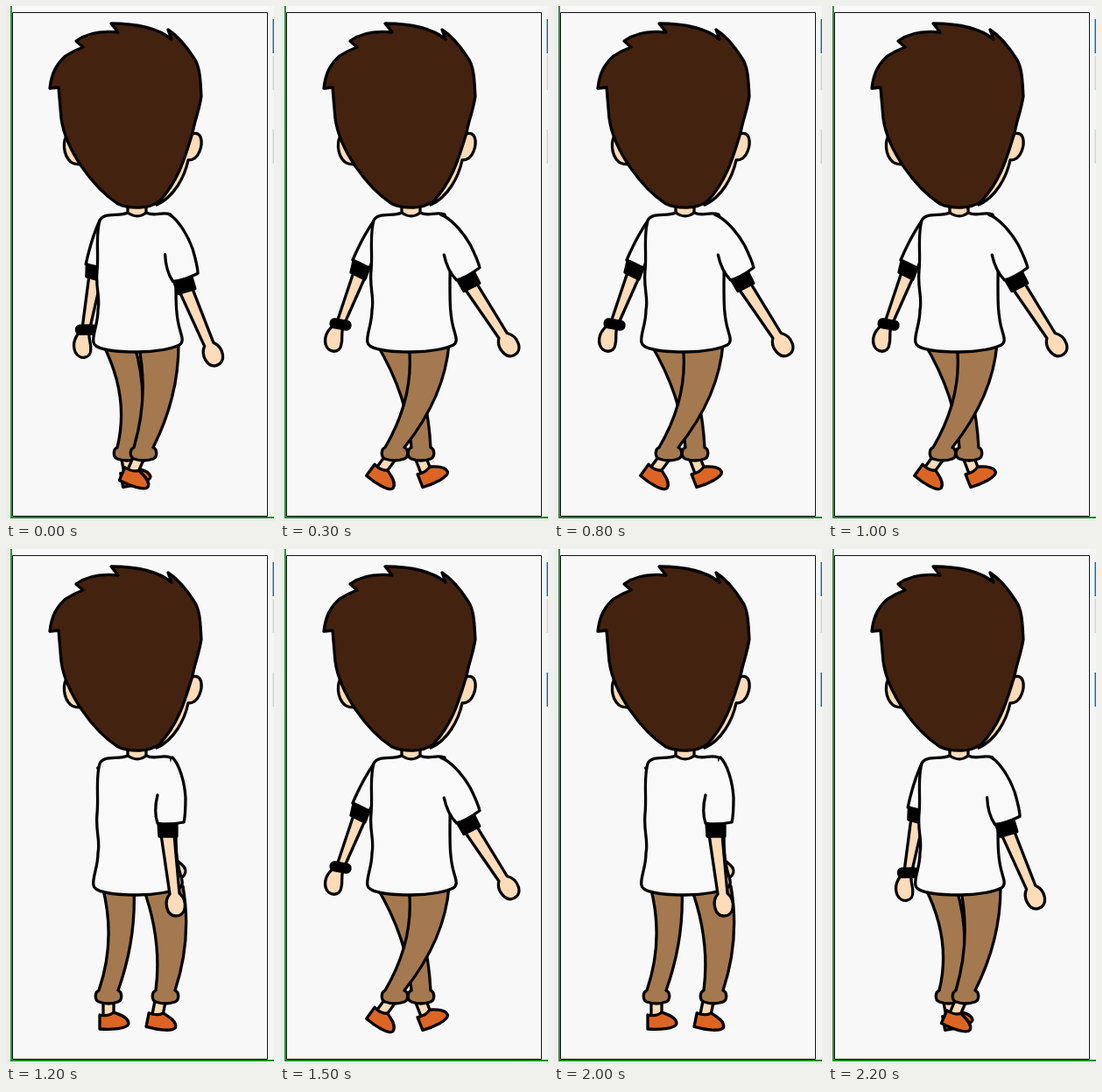
An HTML page that plays this animation: 306 px wide and 588 px high, repeating every 2.3 s.

```html
<!DOCTYPE html>
<html lang="en">
<head>
<meta charset="utf-8">
<title>Walking man</title>
<style>
  html, body { margin: 0; width: 100%; height: 100%; overflow: hidden; background: #f8f8f8; }
  svg { display: block; width: 306px; height: 588px; }
  .figure { stroke: #000; stroke-width: 3.3; stroke-linecap: round; stroke-linejoin: round; }
  .skin { fill: #fedbb9; }
  .shirt { fill: #f9f9f9; }
  .hair { fill: #442210; }
  .pants { fill: #a4794f; }
  .shoe { fill: #dd6524; }
</style>
</head>
<body>
<svg viewBox="0 0 306 588">
  <!-- window edges -->
  <path fill="#eceeed" d="M0 0H5V588H0ZM5 585H306V588H5Z"/>
  <path fill="#f4f5f5" d="M299 0H306V584H299Z"/>
  <path fill="none" stroke="#138a1c" stroke-width="1.8" d="M6 0V584H306"/>
  <path fill="none" stroke="#111" d="M7.5 7.5H298.5V582.5H7.5Z"/>
  <path fill="#1672b8" d="M304.5 15H306V54H304.5Z"/>
  <path fill="#d4d4d4" d="M304.5 57H306V96H304.5Z"/>
  <path id="button" d="M304.5 141H306V180H304.5Z"/>

  <g class="figure">
    <g id="leftArm">
      <path class="skin" d="M84 304L65 361C55 369 50 376 52 386C55 397 69 397 70 386C72 379 69 372 73 364L97 310Z"/>
      <path d="M84 291L102 299L97 312L81 304Z"/>
      <path class="shirt" d="M108 244C98 258 89 276 83 290C89 292 96 297 102 299L114 275Z"/>
      <rect x="58" y="359" width="22" height="9" rx="4" transform="rotate(10 69 364)"/>
    </g>
    <g id="legs"></g>
    <path class="skin" d="M139 226V238C146 242 154 242 160 237V226Z"/>
    <path class="shirt" d="M139 236C129 241 111 235 107 245C102 262 106 282 104 302C102 324 108 332 105 347C105 364 98 376 100 384C101 393 130 395 150 395C172 395 190 391 198 387C204 383 200 376 199 371C194 355 194 338 194 318C194 295 196 262 188 238C177 234 171 241 160 236C154 241 146 241 139 236Z"/>
    <g id="rightArm">
      <path class="skin" d="M177 326L187 394C180 402 183 419 194 419C206 419 208 402 198 393L192 326Z"/>
      <path d="M174 313H195V328H175Z"/>
      <path class="shirt" d="M190 238C198 246 204 266 205 284C205 298 204 308 203 312C192 314 182 315 173 313C170 304 170 293 173 281"/>
    </g>
    <path class="skin" d="M71 146C64 153 65 170 74 178C78 181 82 181 86 181Z"/>
    <path class="skin" d="M212 146C224 142 225 156 221 166C218 174 212 176 208 176C204 195 192 218 172 227Z"/>
    <path class="hair" d="M60 93L50 94C52 76 58 66 68 57C74 53 80 50 88 47L80 40C92 31 108 28 128 30L120 20C148 20 172 24 189 38L185 27C196 34 206 46 215 60C222 70 222 88 223 103C220 122 216 128 213 145C206 166 199 198 175 223C163 232 142 232 128 226C100 208 68 165 63 128Z"/>
  </g>
</svg>
<script>
const $ = id => document.getElementById(id);
const frames = 23, step = 100;

// Pose swings 0 (arms in) to 4 (arms out) and back; the first two strides each skip a pose.
function poseAt(frame) {
  const phase = frame + Math.min(2, Math.floor((frame + 2) / 7));
  return 4 - Math.abs(4 - (phase + 2) % 8);
}

// Straight lines through the values at poses 0, 2 and 3, extended to pose 4
const through = (pose, a, b, c) =>
  pose < 2 ? a + (b - a) * pose / 2 : b + (c - b) * (pose - 2);

// One edge: control point that makes a quadratic pass through the knee
const bend = (hip, knee, cuff) => 2 * knee - (hip + cuff) / 2;

function leg({ hip, hipHalf, knee, kneeHalf, cuff, foot, level }) {
  const top = 385, y = 504, mid = bend(top, 445, y);
  const edge = side => ({
    h: hip + side * hipHalf, k: bend(hip + side * hipHalf, knee + side * kneeHalf, cuff + side * 11), c: cuff + side * 11
  });
  const l = edge(-1), r = edge(1);
  return `<g transform="translate(${foot} 517) rotate(${(level - cuff) * 0.48})">
      <path class="skin" d="M-6 -4V18H6V-4Z"/>
      <path class="shoe" d="M-10 15V31C3 32 21 31 23 25C23 17 11 14 6 12C1 16 -5 16 -10 15Z"/>
    </g>
    <path class="pants" d="M${l.h} ${top}Q${l.k} ${mid} ${l.c} ${y}c-5 2 -5 11 0 13q11 4 22 0c5 -2 5 -11 0 -13Q${r.k} ${mid} ${r.h} ${top}Z"/>`;
}

function show(frame) {
  const pose = poseAt(frame);
  const at = (a, b, c) => through(pose, a, b, c);
  const backCuff = at(117, 138, 161), frontCuff = at(182, 157, 131);
  $("leftArm").setAttribute("transform", `rotate(${at(-56, -11, 0)} 112 250)`);
  $("rightArm").setAttribute("transform", `rotate(${at(0, -16.2, -26.3)} 187 252)`);
  $("legs").innerHTML =
    leg({ hip: 128, hipHalf: 18, knee: at(130, 143, 151), kneeHalf: 13, cuff: backCuff, foot: backCuff, level: 117 }) +
    leg({ hip: at(179, 174, 170), hipHalf: 23, knee: at(188, 173, 161), kneeHalf: 17, cuff: frontCuff, foot: frontCuff - 6, level: 206 });
  $("button").setAttribute("fill", frame < 13 ? "#d4d4d4" : "#1672b8");
}

let shown = -1;
function tick() {
  const frame = Math.floor(performance.now() / step) % frames;
  if (frame !== shown) show(shown = frame);
  requestAnimationFrame(tick);
}
tick();
</script>
</body>
</html>
```
